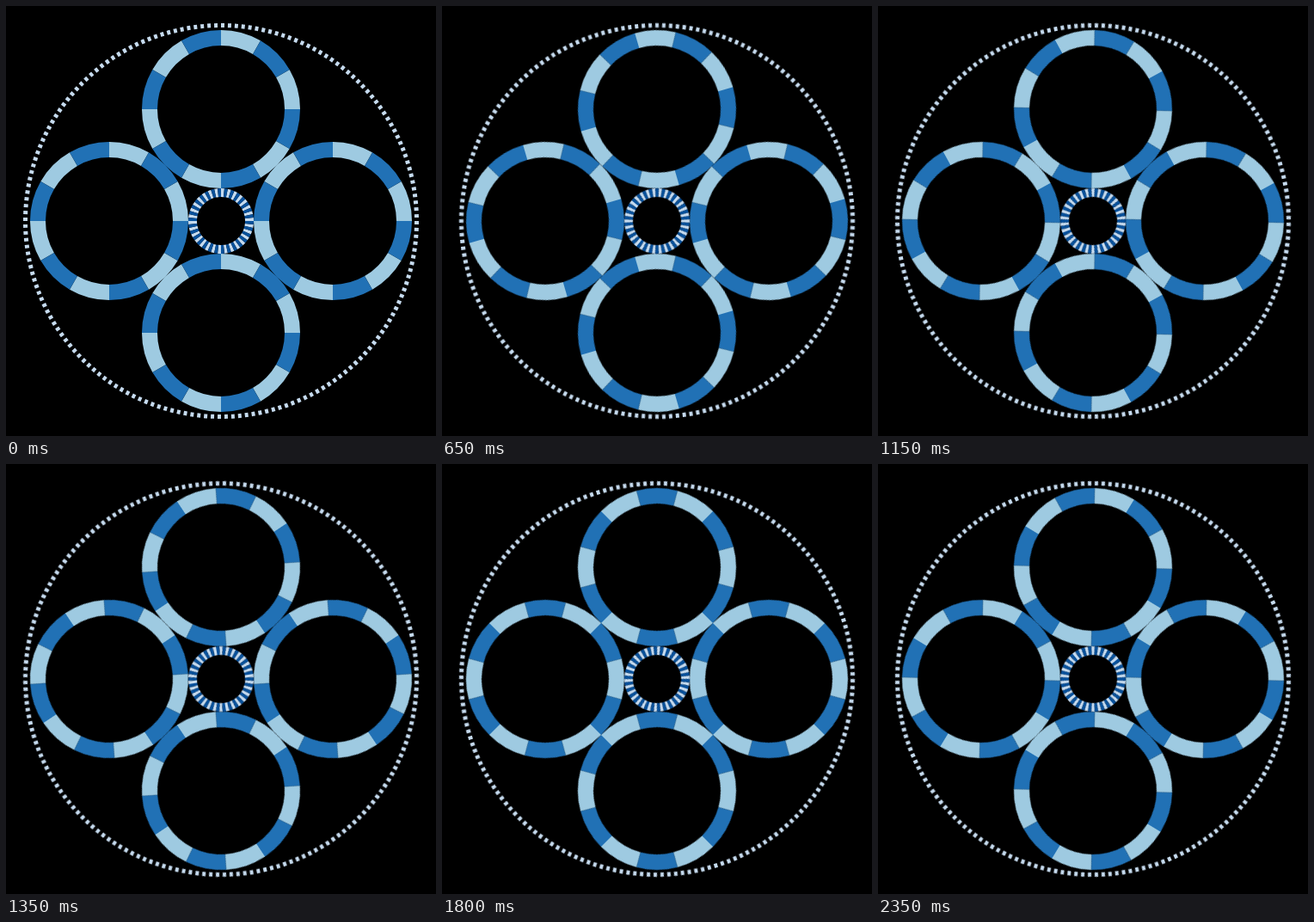
An HTML page for the animation above (2400 ms loop, 500 px wide and 500 px high).

```html
<!DOCTYPE html>
<html lang="en">
<head>
<meta charset="utf-8">
<title>Planetary rings</title>
<style>
  html, body { margin: 0; width: 100%; height: 100%; overflow: hidden; background: #000; }
  svg { display: block; width: 500px; height: 500px; }
</style>
</head>
<body>
<svg viewBox="0 0 500 500"></svg>
<script>
const LOOP = 2400, STEPS = 48;
const svg = document.querySelector('svg');

// One band of alternating segments; `turn` is its rotation per loop in degrees.
function ring({ x, y, inner, outer, pairs, light, dark, turn }) {
  const arc = 180 / pairs;
  const point = (r, deg) => {
    const a = deg * Math.PI / 180;
    return `${(r * Math.sin(a)).toFixed(3)} ${(-r * Math.cos(a)).toFixed(3)}`;
  };
  const segments = offset => {
    let d = '';
    for (let i = 0; i < pairs; i++) {
      const a = (2 * i + offset) * arc, b = a + arc;
      d += `M${point(outer, a)}A${outer} ${outer} 0 0 1 ${point(outer, b)}` +
           `L${point(inner, b)}A${inner} ${inner} 0 0 0 ${point(inner, a)}Z`;
    }
    return d;
  };
  const add = (parent, name, attrs) => {
    const el = document.createElementNS('http://www.w3.org/2000/svg', name);
    for (const key in attrs) el.setAttribute(key, attrs[key]);
    return parent.appendChild(el);
  };
  const place = add(svg, 'g', { transform: `translate(${x} ${y})` });
  const wheel = add(place, 'g', {});
  add(wheel, 'path', { d: segments(0), fill: light });
  if (dark) add(wheel, 'path', { d: segments(1), fill: dark });
  wheel.animate(
    { transform: ['rotate(0deg)', `rotate(${turn}deg)`] },
    { duration: LOOP, iterations: Infinity, easing: `steps(${STEPS})`, delay: -1 }
  );
}

ring({ x: 250, y: 250, inner: 225, outer: 230, pairs: 180, light: '#c6dbef', turn: -24 });
for (const [dx, dy] of [[0, -1], [1, 0], [0, 1], [-1, 0]]) {
  ring({ x: 250 + 130 * dx, y: 250 + 130 * dy, inner: 74, outer: 92,
         pairs: 6, light: '#9ecae1', dark: '#2171b5', turn: -60 });
}
ring({ x: 250, y: 250, inner: 28, outer: 38, pairs: 30,
       light: '#c6dbef', dark: '#08519c', turn: 144 });
</script>
</body>
</html>
```
